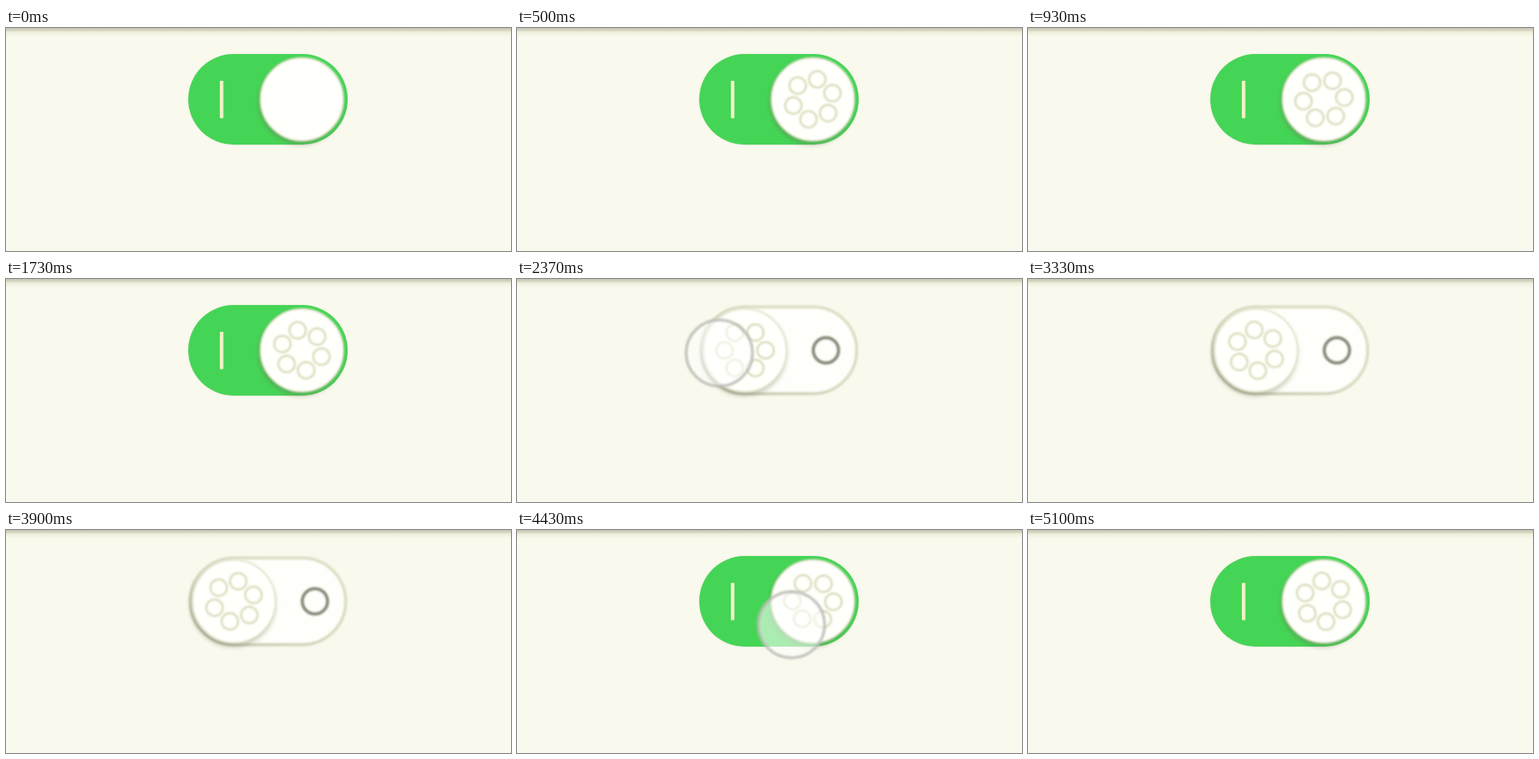
Write an HTML page that moves like this. It is 640 px wide and 283 px high and loops after 5130 ms.

```html
<!DOCTYPE html>
<html lang="en">
<head>
<meta charset="utf-8">
<title>Toggle</title>
<style>
  html, body { margin: 0; width: 100%; height: 100%; overflow: hidden; background: #f9f9ee; }
  svg { display: block; width: 100%; height: 100%; }
</style>
</head>
<body>
<svg viewBox="0 0 640 283" preserveAspectRatio="none">
  <defs>
    <linearGradient id="edge" x1="0" y1="0" x2="0" y2="1">
      <stop offset="0" stop-color="#c4c4b2"/>
      <stop offset=".3" stop-color="#d8d8c4"/>
      <stop offset=".45" stop-color="#eeeeda"/>
      <stop offset="1" stop-color="#f9f9ee"/>
    </linearGradient>
    <linearGradient id="rim" x1="0" y1="1" x2="1" y2="0">
      <stop offset="0" stop-color="#c4c4ae"/>
      <stop offset=".5" stop-color="#dcdcc4"/>
      <stop offset="1" stop-color="#e0e0c8"/>
    </linearGradient>
    <filter id="soft" x="-30%" y="-30%" width="160%" height="160%">
      <feGaussianBlur stdDeviation="3"/>
    </filter>
    <filter id="blur" x="-10%" y="-10%" width="120%" height="120%">
      <feGaussianBlur stdDeviation=".8"/>
    </filter>
  </defs>
  <rect width="640" height="283" fill="#f9f9ee"/>
  <rect width="640" height="11" fill="url(#edge)"/>
  <g filter="url(#blur)">
    <rect x="233.5" y="35.5" width="197" height="110" rx="55" fill="#fefefa" stroke="url(#rim)" stroke-width="4"/>
    <circle cx="391.5" cy="90.5" r="16" fill="none" stroke="#8e8e7e" stroke-width="4.5"/>
  </g>
  <g id="on">
    <rect x="231" y="33" width="202" height="115" rx="57.5" fill="#45d556"/>
    <rect x="271" y="67" width="4.5" height="47.5" rx="1" fill="#eef4c4"/>
  </g>
  <g id="knob">
    <circle cx="-1.5" cy="4" r="53.5" fill="#6c6c50" opacity=".38" filter="url(#soft)"/>
    <circle r="52.5" fill="#fffffc" stroke="#e4e4cc" stroke-width="2" filter="url(#blur)"/>
    <g id="dial" fill="none" stroke="#dcdcbc" stroke-width="2.6" filter="url(#blur)"/>
  </g>
  <g id="touch" filter="url(#blur)">
    <circle r="42" fill="#fff" fill-opacity=".55" stroke="#bcbcb6" stroke-opacity=".8" stroke-width="4"/>
  </g>
</svg>
<script>
  const LOOP = 5130;
  const byId = id => document.getElementById(id);
  const [on, knob, dial, touch] = ['on', 'knob', 'dial', 'touch'].map(byId);

  for (let i = 0; i < 6; i++) {
    const hole = document.createElementNS('http://www.w3.org/2000/svg', 'circle');
    const angle = i * Math.PI / 3;
    hole.setAttribute('cx', 26 * Math.cos(angle));
    hole.setAttribute('cy', 26 * Math.sin(angle));
    hole.setAttribute('r', 10.5);
    dial.append(hole);
  }

  const progress = (t, from, to) => Math.min(1, Math.max(0, (t - from) / (to - from)));
  const smooth = (t, from, to) => {
    const p = progress(t, from, to);
    return p * p * (3 - 2 * p);
  };
  const mix = (a, b, p) => a + (b - a) * p;

  // Each swipe fades in, travels between two points and fades out.
  const swipes = [
    { start: 1900, end: 2440, fade: 2700, from: [372, 92], to: [251, 94] },
    { start: 3980, end: 4500, fade: 4740, from: [286, 104], to: [351, 121] }
  ];

  function dialAngle(t) {
    if (t < 2040) return 18 + (t - 1730) * 0.029;
    if (t < 4260) return Math.max(0, t - 2480) * 0.0294;
    return Math.max(0, t - 4400) * 0.0343;
  }

  function draw(t) {
    const state = 1 - smooth(t, 1940, 2150) + smooth(t, 4160, 4380);
    on.setAttribute('opacity', state);
    knob.setAttribute('transform', `translate(${mix(289, 375, state)} 90.5)`);
    dial.setAttribute('transform', `rotate(${dialAngle(t)})`);
    dial.setAttribute('opacity', smooth(t, 100, 400));

    const swipe = t < 3000 ? swipes[0] : swipes[1];
    const { start, end, fade, from, to } = swipe;
    const p = smooth(t, start, end);
    touch.setAttribute('transform', `translate(${mix(from[0], to[0], p)} ${mix(from[1], to[1], p)})`);
    touch.setAttribute('opacity', progress(t, start, start + 90) * (1 - progress(t, end, fade)));
  }

  const begin = performance.now();
  function tick() {
    draw((performance.now() - begin) % LOOP);
    requestAnimationFrame(tick);
  }
  draw(0);
  requestAnimationFrame(tick);
</script>
</body>
</html>
```
